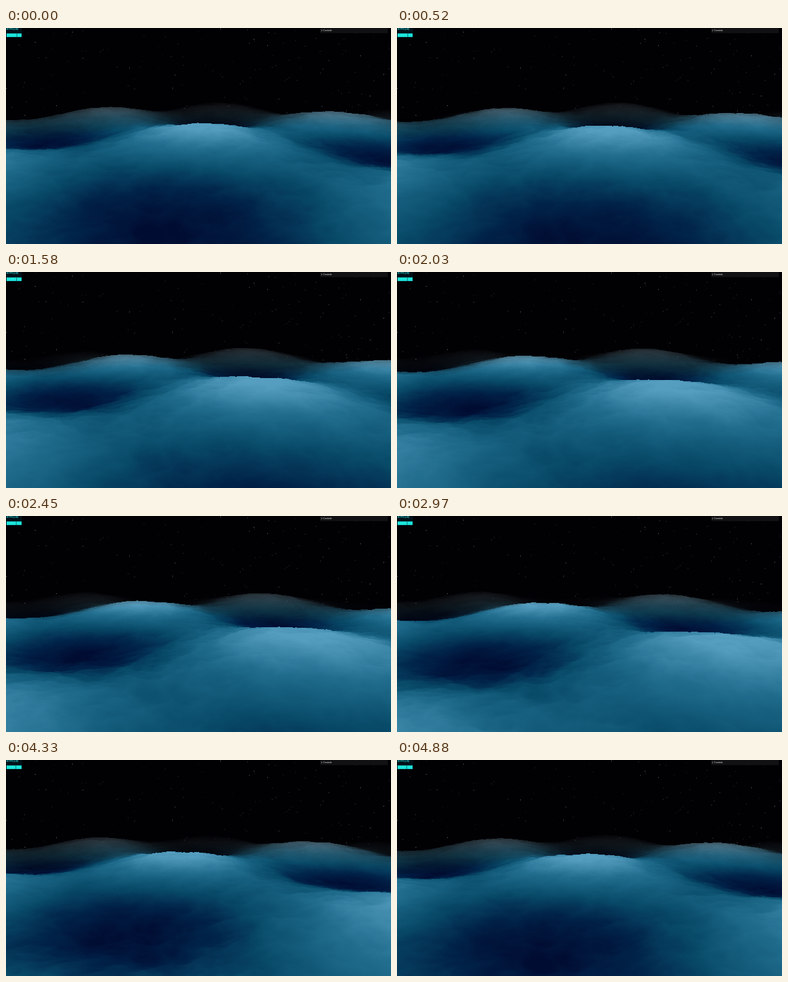
An HTML page with a canvas for the animation above (4.91 s loop, 600 by 338 pixels).

```html
<!DOCTYPE html>
<html lang="en">
<head>
<meta charset="utf-8">
<title>Night sea</title>
<style>
  html, body { margin: 0; width: 100%; height: 100%; overflow: hidden; background: #010104; }
  svg, canvas { position: absolute; left: 0; top: 0; width: 600px; height: 338px; }
  text { font-family: "Liberation Sans", Arial, sans-serif; }
</style>
</head>
<body>
<svg id="sky" viewBox="0 0 600 338"></svg>
<canvas id="sea" width="600" height="338"></canvas>
<svg viewBox="0 0 600 338">
  <rect width="25" height="15" fill="#011018"/>
  <text x="1" y="3.1" font-size="2.9" font-weight="bold" fill="#2bd5d8">60 FPS (5-60)</text>
  <rect x="1" y="8.5" width="23.3" height="5.6" fill="#1ce6dc"/>
  <rect id="tick" y="8.5" width="0.8" height="5.6" fill="#075a60"/>
  <rect x="490" width="105" height="8" fill="#111113"/>
  <path d="M491 2.4l1.4 1.5l-1.4 1.5" fill="none" stroke="#ddd" stroke-width=".6"/>
  <text x="494.2" y="5.2" font-size="3.6" fill="#eee">Controls</text>
</svg>
<script>
const W = 600, H = 338, LOOP = 4910;
const WAVE_PERIOD = 5180;
const HORIZON = 80, FOCAL = 516, EYE = 1.29, AMP = 0.14;
const NEAR = 1.9, FAR = 14.5, RATIO = 1.005, HAZE_START = 9;
const STEPS = Math.ceil(Math.log(FAR / NEAR) / Math.log(RATIO));

let seed = 7;
const random = () => (seed = (seed * 16807) % 2147483647) / 2147483647;
const clamp = v => Math.max(0, Math.min(1, v));
const mix = (a, b, k) => a + (b - a) * k;

// Stars: a few bright ones among random faint ones
const star = (x, y, size, alpha) =>
  `<rect x="${x}" y="${y}" width="${size}" height="${size}" fill="#b4c4cc" opacity="${alpha}"/>`;
let stars = [[334, 1], [103, 6], [588, 72], [567, 106], [29, 136], [78, 121],
             [45, 22], [552, 43], [386, 17], [407, 27], [0, 94], [192, 62]]
  .map(([x, y]) => star(x, y, 1, 0.6)).join('');
for (let i = 0; i < 180; i++)
  stars += star(random() * W, random() * 150, 0.6 + random() * 0.5, 0.15 + random() * 0.35);
document.getElementById('sky').innerHTML = stars;

// Gradient noise
const gradients = Array.from({ length: 256 }, () => {
  const a = random() * 2 * Math.PI;
  return [Math.cos(a), Math.sin(a)];
});
const perm = Array.from({ length: 256 }, () => random() * 256 | 0);
const fade = t => t * t * t * (t * (t * 6 - 15) + 10);
function noise(x, y) {
  const ix = Math.floor(x), iy = Math.floor(y), fx = x - ix, fy = y - iy;
  const corner = (i, j) => {
    const g = gradients[(perm[(ix + i) & 255] + iy + j) & 255];
    return g[0] * (fx - i) + g[1] * (fy - j);
  };
  const u = fade(fx);
  return mix(mix(corner(0, 0), corner(1, 0), u), mix(corner(0, 1), corner(1, 1), u), fade(fy));
}
function billows(x, z) {
  let sum = 0.035;
  for (const [freq, amp] of [[1.2, 0.075], [2.7, 0.045], [5.6, 0.026], [12, 0.011]])
    sum -= amp * Math.abs(noise(x * freq + 40, z * freq + freq));
  return sum;
}

// The still part of the surface, the moving wave's phase and the haze, per column and depth
const grid = () => new Float32Array(W * STEPS);
const still = grid(), waveCos = grid(), waveSin = grid(), haze = grid(), alpha = grid();
const scale = new Float32Array(STEPS);
for (let s = 0; s < STEPS; s++) {
  const z = NEAR * RATIO ** s;
  scale[s] = FOCAL / z;
  for (let col = 0; col < W; col++) {
    const x = (col + 0.5 - W / 2) * z / FOCAL, dx = x - 0.074, dz = z - 7.05;
    const a = -0.652 * dx + 0.927 * dz, b = 1.033 * dx + 0.743 * dz;
    const i = col * STEPS + s;
    still[i] = AMP * Math.cos(b) + billows(x, z);
    waveCos[i] = AMP * Math.cos(a);
    waveSin[i] = AMP * Math.sin(a);
    haze[i] = clamp((Math.hypot(x, z) - HAZE_START) / (FAR - HAZE_START));
    alpha[i] = 255 * (1 - haze[i]) ** 1.1;
  }
}

// Depth to crest colours
const stops = [[0, 1, 12, 50], [0.18, 1, 34, 72], [0.42, 9, 76, 106], [0.7, 34, 110, 143], [1, 86, 158, 192]];
const ramp = Array.from({ length: 256 }, (_, i) => {
  const e = i / 255, n = Math.max(1, stops.findIndex(s => s[0] >= e));
  const lo = stops[n - 1], hi = stops[n], k = (e - lo[0]) / (hi[0] - lo[0]);
  return [1, 2, 3].map(c => mix(lo[c], hi[c], k));
});

const ctx = document.getElementById('sea').getContext('2d');
const image = ctx.createImageData(W, H);
const pixels = new Uint32Array(image.data.buffer);
const tick = document.getElementById('tick');

function draw(t) {
  const phase = 2 * Math.PI * t / WAVE_PERIOD, c = Math.cos(phase), s = Math.sin(phase);
  pixels.fill(0);
  for (let col = 0; col < W; col++) {
    let top = H;
    for (let step = 0, i = col * STEPS; step < STEPS; step++, i++) {
      const h = still[i] + waveCos[i] * c - waveSin[i] * s;
      const y = Math.max(0, Math.round(HORIZON + (EYE - h) * scale[step]));
      if (y >= top) continue;
      const e = clamp((h + 0.29) / 0.57), rgb = ramp[e * 255 | 0];
      const k = haze[i], grey = 120 * e;
      const color = (alpha[i] << 24 | mix(rgb[2], grey, k) << 16 |
                     mix(rgb[1], grey, k) << 8 | mix(rgb[0], grey, k)) >>> 0;
      while (top > y) pixels[--top * W + col] = color;
    }
  }
  ctx.putImageData(image, 0, 0);
  tick.setAttribute('x', 16.6 - t * 0.0004);
}

function frame() {
  draw(performance.now() % LOOP);
  requestAnimationFrame(frame);
}
frame();
</script>
</body>
</html>
```
